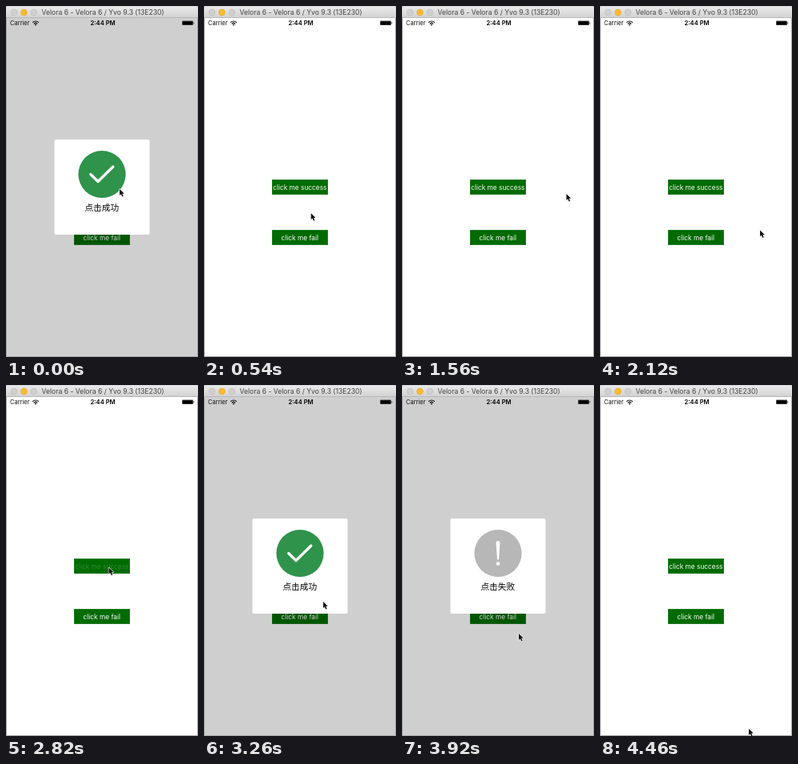
These frames come from a looping animation (240 px wide and 439 px high, 4480 ms). An HTML page with a canvas:

```html
<!DOCTYPE html>
<html lang="en">
<head>
<meta charset="utf-8">
<title>Toast demo</title>
<style>
html, body { margin: 0; width: 100%; height: 100%; overflow: hidden; background: #fff; }
canvas { display: block; width: 240px; height: 439px; }
</style>
</head>
<body>
<canvas id="stage" width="240" height="439"></canvas>
<script>
const ctx = document.getElementById('stage').getContext('2d');
const LOOP = 4480, STEP = 20;
const TOAST_DELAY = 60, PRESS_TIME = 110;
const UI = 'Inter, sans-serif';
const CJK = '"Noto Sans CJK SC", "Noto Sans CJK", sans-serif';

const clicks = [
  { at: -60, kind: 'ok', hide: 400 },
  { at: 1040, kind: 'fail', hide: 1500 },
  { at: 2800, kind: 'ok', hide: 3340 },
  { at: 3700, kind: 'fail', hide: 4400 }
];

// Resting places of the pointer tip
const stops = [
  { t: 0, x: 142, y: 229 },
  { t: 1100, x: 125, y: 291 },
  { t: 1560, x: 205.5, y: 235 },
  { t: 2160, x: 200, y: 281 },
  { t: 2820, x: 128.5, y: 228.5 },
  { t: 3260, x: 149, y: 271 },
  { t: 3740, x: 125, y: 291 },
  { t: 3920, x: 146, y: 311 },
  { t: 4460, x: 186, y: 430 }
];

const smooth = k => k * k * (3 - 2 * k);
const mix = (a, b, k) => a + (b - a) * k;

function pointerAt(t) {
  const i = Math.max(1, stops.findIndex(s => s.t >= t));
  const a = stops[i - 1], b = stops[i];
  const k = smooth((t - a.t) / (b.t - a.t));
  return [mix(a.x, b.x, k), mix(a.y, b.y, k)];
}

function rect(x, y, w, h, fill) {
  ctx.fillStyle = fill;
  ctx.fillRect(x, y, w, h);
}

function rounded(x, y, w, h, r, fill) {
  ctx.beginPath();
  ctx.roundRect(x, y, w, h, r);
  ctx.fillStyle = fill;
  ctx.fill();
}

function disc(x, y, r, fill) {
  ctx.beginPath();
  ctx.arc(x, y, r, 0, 2 * Math.PI);
  ctx.fillStyle = fill;
  ctx.fill();
}

function stroke(color, width) {
  ctx.strokeStyle = color;
  ctx.lineWidth = width;
  ctx.lineCap = ctx.lineJoin = 'round';
  ctx.stroke();
}

function label(text, x, y, font, fill, align = 'center') {
  ctx.font = font;
  ctx.textAlign = align;
  ctx.fillStyle = fill;
  ctx.fillText(text, x, y);
}

function titleBar() {
  const g = ctx.createLinearGradient(0, 0, 0, 14);
  g.addColorStop(0, '#ebebeb');
  g.addColorStop(1, '#d3d3d3');
  rect(0, 0, 240, 14, '#c4cbd2');
  rounded(0, 0.5, 240, 14, [3, 3, 0, 0], g);
  rect(0, 14, 240, 1, '#b8b8b8');
  for (let i = 0; i < 3; i++) {
    const lit = i === 1;
    disc(10 + i * 12.4, 8, 3.9, lit ? '#fbbb2f' : '#cfcfcf');
    stroke(lit ? '#e5a52c' : '#bdbdbd', 0.6);
  }
  label('Velora 6 - Velora 6 / Yvo 9.3 (13E230)', 121, 11.2, '8.6px ' + UI, '#444');
}

function statusBar() {
  label('Carrier', 5, 24, '7.5px ' + UI, '#111', 'left');
  label('2:44 PM', 121, 24, '600 7.6px ' + UI, '#000');
  for (const r of [2.7, 5]) {
    ctx.beginPath();
    ctx.arc(37, 24, r, -2.35, -0.79);
    stroke('#111', 1.1);
  }
  disc(37, 23.5, 0.9, '#000');
  rounded(220, 18.5, 14, 5.5, 1, '#444');
  rect(221, 19.3, 12, 4, '#000');
  rect(234.4, 20.2, 0.8, 2.2, '#333');
}

function button(text, y, pressed) {
  rect(85, y, 70, 19, '#006b00');
  ctx.strokeStyle = 'rgba(255,255,255,.12)';
  ctx.lineWidth = 1;
  ctx.strokeRect(85.5, y + 0.5, 69, 18);
  label(text, 119.8, y + 12.8, '8.3px ' + UI, pressed ? 'rgba(255,255,255,.2)' : '#fff');
}

function windowEdge() {
  rect(0, 15, 1, 424, '#a9adb0');
  rect(239, 15, 1, 424, '#a9a9a9');
  rect(0, 438, 240, 1, '#a9a9a9');
}

function checkMark() {
  ctx.beginPath();
  ctx.moveTo(105.8, 210.5);
  ctx.lineTo(115, 219.5);
  ctx.lineTo(133.8, 201);
  stroke('#fff', 3.3);
}

function exclamation() {
  ctx.beginPath();
  ctx.moveTo(117.5, 197);
  ctx.quadraticCurveTo(120, 192.5, 122.5, 197);
  ctx.lineTo(121, 218);
  ctx.quadraticCurveTo(120, 219.5, 119, 218);
  ctx.fillStyle = '#fff';
  ctx.fill();
  disc(120, 223.5, 2.3, '#fff');
}

function toast(kind) {
  const ok = kind === 'ok';
  rounded(60.5, 167, 119, 119, 2, '#fff');
  disc(120, 210.5, 29.6, ok ? '#2f934b' : '#b7b7b7');
  if (ok) checkMark();
  else exclamation();
  label(ok ? '点击成功' : '点击失败', 119.8, 256, '10.7px ' + CJK, '#000');
}

function pointer(x, y) {
  ctx.save();
  ctx.translate(x, y);
  ctx.scale(0.9, 0.9);
  const arrow = new Path2D('M0 0V8.8L2 7L3.6 10.6L5.2 9.9L3.7 6.4L6.3 6.2Z');
  ctx.strokeStyle = 'rgba(255,255,255,.85)';
  ctx.lineWidth = 1.5;
  ctx.stroke(arrow);
  ctx.fillStyle = '#111';
  ctx.fill(arrow);
  ctx.restore();
}

function draw(t) {
  const pressed = clicks.find(c => t >= c.at && t < c.at + PRESS_TIME)?.kind;
  const shown = clicks.find(c => t >= c.at + TOAST_DELAY && t < c.hide)?.kind;
  rect(0, 0, 240, 439, '#fff');
  button('click me success', 217, pressed === 'ok');
  button('click me fail', 280, pressed === 'fail');
  if (shown) rect(1, 15, 238, 423, 'rgba(0,0,0,.19)');
  titleBar();
  statusBar();
  windowEdge();
  if (shown) toast(shown);
  pointer(...pointerAt(t));
}

const start = performance.now();
function tick() {
  const t = (performance.now() - start) % LOOP;
  draw(Math.floor(t / STEP) * STEP);
  requestAnimationFrame(tick);
}
tick();
</script>
</body>
</html>
```
